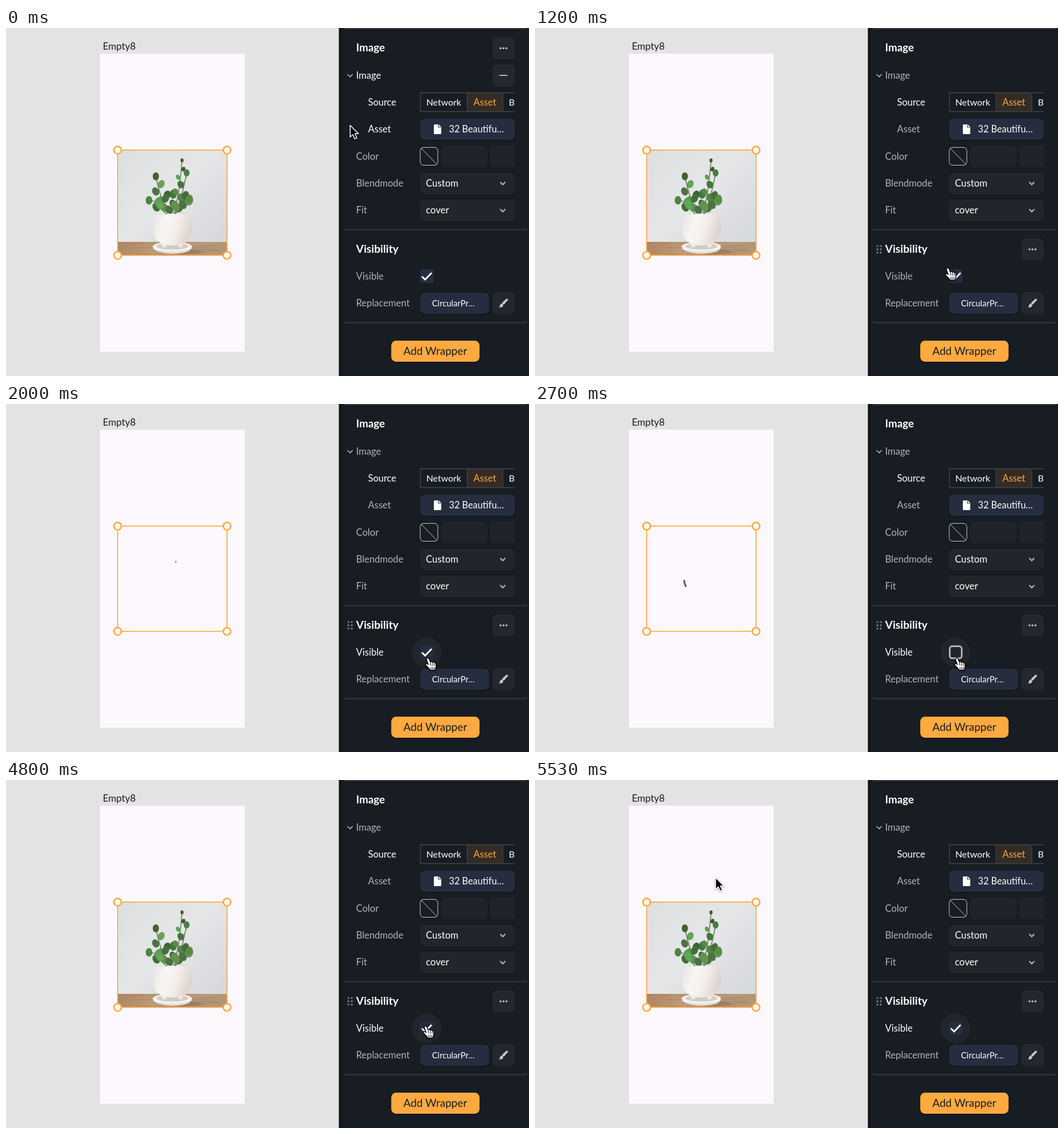
An HTML page that plays this animation: 918 by 610 pixels, repeating every 5670 ms.

```html
<!DOCTYPE html>
<html lang="en">
<head>
<meta charset="utf-8">
<title>Visibility panel</title>
<style>
html, body { margin: 0; width: 100%; height: 100%; overflow: hidden; background: #e3e3e3; }
svg { display: block; width: 918px; height: 610px; }
text { font-family: Lato, "Open Sans", sans-serif; white-space: pre; }
.raised { filter: drop-shadow(0 1px 1.5px rgba(0, 0, 0, .4)); }
</style>
</head>
<body>
<svg viewBox="0 0 918 610" xmlns="http://www.w3.org/2000/svg">
  <defs>
    <linearGradient id="wall" x1="0" y1="0" x2="1" y2="1">
      <stop offset="0" stop-color="#dddfe0"/><stop offset=".45" stop-color="#e5e6e8"/><stop offset="1" stop-color="#d3d5d9"/>
    </linearGradient>
    <linearGradient id="wood" x1="0" y1="0" x2="1" y2="0">
      <stop offset="0" stop-color="#ae8662"/><stop offset=".4" stop-color="#c2a182"/><stop offset="1" stop-color="#b39477"/>
    </linearGradient>
    <linearGradient id="china" x1="0" y1="0" x2="1" y2=".25">
      <stop offset="0" stop-color="#e6e2de"/><stop offset=".35" stop-color="#f8f6f4"/><stop offset=".65" stop-color="#f3efec"/><stop offset="1" stop-color="#ddd6d0"/>
    </linearGradient>
    <clipPath id="photoClip"><rect x="196" y="214" width="192" height="184.5"/></clipPath>
    <clipPath id="panelClip"><rect x="584" y="0" width="309" height="610"/></clipPath>
  </defs>

  <rect width="918" height="610" fill="#e3e3e3"/>
  <rect x="165" y="45" width="254" height="522.5" fill="#fcf8fe"/>

  <g id="photo" clip-path="url(#photoClip)">
    <rect x="196" y="214" width="192" height="185" fill="url(#wall)"/>
    <rect x="196" y="375" width="192" height="24" fill="url(#wood)"/>
    <g id="grain" stroke="#8d6a4b" opacity=".5"></g>
    <ellipse cx="304" cy="392" rx="40" ry="5" fill="#7d6048" opacity=".4"/>
    <g id="stems" fill="none" stroke="#66724b" stroke-width="1.5"></g>
    <g id="leaves"></g>
    <path d="M258 386Q260 391 273 394Q292 398 312 394Q324 391 326 386Z" fill="#ddd8d2"/>
    <ellipse cx="292" cy="383.5" rx="34.5" ry="9" fill="#f4f1ee"/>
    <ellipse cx="292" cy="382.5" rx="28" ry="6" fill="#d3ccc5"/>
    <path d="M270 370L275 384Q278 386 281 383L284 376ZM300 376L303 383Q306 386 309 384L315 370Z" fill="#efebe7"/>
    <path d="M264 328C257 338 256 356 261 366C266 377 280 381 292 381C306 381 320 377 324 366C329 354 328 338 321 328Q292 323 264 328Z" fill="url(#china)"/>
  </g>

  <path id="spinner" fill="none" stroke="#5f4f98" stroke-width="3"/>

  <rect x="196" y="214" width="192" height="184.5" fill="none" stroke="#fbaa43" stroke-width="1.7"/>
  <g id="grips" fill="#fff" stroke="#fbaa43" stroke-width="2.7"></g>

  <rect x="584.5" width="334" height="610" fill="#181d23"/>
  <rect x="584.5" width="5" height="610" fill="#12161c"/>
  <path d="M593.5 1H914M593.5 353.5H914M593.5 516.5H914" stroke="#3c4148" stroke-width="1.4"/>

  <g clip-path="url(#panelClip)">
    <rect x="810" y="114" width="62" height="32.5" fill="#342b25"/>
    <path d="M900 113.5H727.5V146.5H900M809.5 113.5V146.5M872 113.5V146.5" fill="none" stroke="#41464d" stroke-width="1.3"/>
    <rect class="raised" x="727" y="159" width="166" height="37" rx="8" fill="#252d3f"/>
    <path d="M752.5 169H759.5L764 173.5V184.5Q764 186 762.5 186H752.5Q751 186 751 184.5V170.5Q751 169 752.5 169Z" fill="#fff"/>
    <path d="M759 169.5V174H763.5" fill="none" stroke="#252d3f" stroke-width="1.2"/>
    <g fill="none" stroke="#cfd0d1">
      <rect x="727" y="209.3" width="31" height="31.2" rx="6"/>
      <path d="M729 211L756 238.7"/>
    </g>
    <g id="fields"><rect x="764" y="206" width="81" height="38" rx="8"/><rect x="850" y="206" width="81" height="38" rx="8"/></g>
    <rect id="blendBox" x="727" y="254" width="166" height="37" rx="8"/>
    <rect id="fitBox" x="727" y="301" width="166" height="37" rx="8"/>
    <g fill="none" stroke="#b9bbbe" stroke-width="2">
      <path d="M867.5 270L872 274.5L876.5 270M867.5 317.5L872 322L876.5 317.5"/>
      <path d="M599.5 81L604 85.5L608.5 81" stroke-width="1.6"/>
    </g>
    <g id="minus">
      <rect x="854" y="63.5" width="39" height="39" rx="7.5" fill="#24282e"/>
      <path d="M866 83H880" stroke="#c3c5c7" stroke-width="1.8"/>
    </g>
    <g id="moreImage"></g>
    <g id="moreVisibility"></g>
  </g>

  <circle id="halo" cx="738.3" cy="435.3" r="26"/>
  <rect id="boxOff" x="728" y="424.7" width="21" height="21" rx="4" fill="none" stroke="#bec0c3" stroke-width="2.7"/>
  <g id="boxOn">
    <rect x="726.5" y="423" width="24" height="24" rx="4.5" fill="#252e41"/>
    <path id="tick" d="M730 435.5L735.7 441L747 429.3" pathLength="1" fill="none" stroke="#fff" stroke-width="2.8"/>
  </g>

  <rect class="raised" x="727" y="464" width="121" height="37" rx="8.5" fill="#252d3f"/>
  <rect x="854" y="463" width="39" height="39" rx="7.5" fill="#24282e"/>
  <path d="M879 474.5L881 476.5L873.5 484.5L871 482Z" fill="#c6c8ca" stroke="#c6c8ca" stroke-linejoin="round"/>
  <path d="M869.8 483Q873 483.5 872.7 486.5Q871.5 490.5 865 489.5Q867.2 488.2 867.2 486Q867.5 483.3 869.8 483Z" fill="#c6c8ca"/>
  <rect class="raised" x="676.2" y="548" width="155" height="37" rx="8.5" fill="#ffaa40"/>

  <g id="labels"></g>

  <path id="arrow" class="raised" d="M0 0V20.5L4.8 16.2L8.2 23.8L11.8 22.2L8.5 14.8H14.6Z" fill="#000" stroke="#fff" stroke-width="1.5" stroke-linejoin="round"/>
  <g id="hand" class="raised" stroke="#000" stroke-linejoin="round">
    <path d="M-2.5 2C-4-1.5 .3-3 1.6-.3L4 5.5C5 4 7.4 4.3 7.8 6C9 4.8 11 5.2 11.4 6.9C13 6.3 14.2 7.5 14 9.8L13.6 14.5L12.3 19.5H3.6C2.4 16.5-.4 14.5-4 11C-5.6 8.6-2.6 7.4 .4 9.8Z" fill="#fff" stroke-width="1.3"/>
    <path d="M4.2 6L5 12M7.9 6.5L8.3 12M11.3 7.5V12M5 14V18M7.8 14V18M10.5 14V18"/>
  </g>
</svg>
<script>
const LOOP = 5670, HIDE = 2000, REVEAL = 3400, LEAVE = 4700, LAST = 5530;
const GREY = '#b0b3b7', WHITE = '#fff', PEACH = '#e9c48f', BLUE = '#252d3f', FIELD = '#22262c';
const $ = id => document.getElementById(id);
const set = (el, attrs) => { for (const k in attrs) el.setAttribute(k, attrs[k]); return el; };
const add = (parent, tag, attrs) =>
  parent.appendChild(set(document.createElementNS('http://www.w3.org/2000/svg', tag), attrs));
const show = (id, on) => set($(id), { visibility: on ? 'visible' : 'hidden' });
const mix = (a, b, f) => a + (b - a) * f;
const clamp = x => Math.min(1, Math.max(0, x));

let seed = 7;
const random = () => (seed = seed * 16807 % 2147483647) / 2147483647;

// y is the middle of the row
function label(text, x, y, fill = WHITE, size = 16.6, extra = {}) {
  const el = add($('labels'), 'text', { x, y: y + 5.8, fill, 'font-size': size, ...extra });
  el.textContent = text;
  return el;
}

const bold = { 'font-weight': 700 };
const middle = { 'text-anchor': 'middle' };
const ROW = 47.3;
const rowY = n => 35.6 + n * ROW;
label('Empty8', 170, 32.2, '#1c1c1e', 17);
label('Image', 614.5, rowY(0), WHITE, 18.8, bold);
label('Visibility', 614.5, 388.2, WHITE, 19.3, bold);
label('Source', 635.5, rowY(2), WHITE, 16.5);
label('Network', 768.3, rowY(2), WHITE, 15.9, middle);
label('Asset', 840.5, rowY(2), '#fbaa43', 16.4, middle);
label('B', 882.5, rowY(2), WHITE, 16, { 'clip-path': 'url(#panelClip)' });
label('32 Beautifu…', 777.5, rowY(3), WHITE, 16.3);
label('Custom', 737, rowY(5), WHITE, 16.8);
label('cover', 737, rowY(6), WHITE, 16.8);
label('Replacement', 614.5, 482.5, GREY);
label('CircularPr…', 785, 482, WHITE, 14.8, middle);
label('Add Wrapper', 753.5, 567, '#191c20', 19, middle);

const rows = {};
function row(text, x, y) { rows[text] = { y, el: label(text, x, y) }; }
row('Image', 614.5, rowY(1));
row('Asset', 635.5, rowY(3));
row('Color', 614.5, rowY(4));
row('Blendmode', 614.5, rowY(5));
row('Fit', 614.5, rowY(6));
row('Visible', 614.5, 435.2);
const rowAt = y => Object.keys(rows).find(name => Math.abs(rows[name].y - y) < ROW / 2);

function moreButton(id, y) {
  add($(id), 'rect', { x: 854, y: y - 19.5, width: 39, height: 39, rx: 7.5, fill: '#24282e' });
  for (let i = -1; i < 2; i++) add($(id), 'circle', { cx: 873.2 + i * 5.3, cy: y, r: 1.8, fill: '#c3c5c7' });
}
moreButton('moreImage', 35.5);
moreButton('moreVisibility', 388);
for (let i = 0; i < 6; i++)
  add($('moreVisibility'), 'circle', { cx: 601 + i % 2 * 6, cy: 382.2 + (i >> 1) * 5.7, r: 1.8, fill: '#6f737a' });
for (let i = 0; i < 4; i++)
  add($('grips'), 'circle', { cx: 196 + i % 2 * 192, cy: 214 + (i >> 1) * 184.5, r: 6.5 });

for (let y = 376; y < 399; y += 3) {
  const x = 196 + random() * 90;
  add($('grain'), 'path', { d: `M${x} ${y}h${60 + random() * 90}` });
}

function leaf(cx, cy, size, turn) {
  const fill = `hsl(${95 + random() * 25} ${24 + random() * 10}% ${27 + random() * 24}%)`;
  add($('leaves'), 'ellipse', { cx, cy, rx: size * .78, ry: size, fill, transform: `rotate(${turn} ${cx} ${cy})` });
}

// A bent stem with leaves on alternating sides, shrinking towards the tip
function stem(tipX, tipY, count, tipSize) {
  const baseX = mix(290, tipX, .2), bendX = mix(290, tipX, .7), bendY = 300;
  add($('stems'), 'path', { d: `M${baseX} 328Q${bendX} ${bendY} ${tipX} ${tipY}` });
  for (let i = 0; i < count; i++) {
    const u = mix(.3, 1, i / (count - 1));
    const size = mix(8.5, tipSize, u);
    const side = i === count - 1 ? 0 : i % 2 ? 1 : -1;
    leaf(mix(mix(baseX, bendX, u), mix(bendX, tipX, u), u) + side * size * .9,
      mix(mix(328, bendY, u), mix(bendY, tipY, u), u), size, side * 25);
  }
}
for (let i = 0; i < 9; i++)
  leaf(292 + 20 * Math.cos(i * 2.4), 305 + 14 * Math.sin(i * 2.4), 7 + random() * 2, random() * 120 - 60);
stem(251, 302, 3, 7.5);
stem(263, 260, 5, 7);
stem(309, 232, 7, 3.5);
stem(317, 254, 4, 6.5);
stem(322, 300, 3, 8);

// Material "fast out, slow in": cubic-bezier(.4, 0, .2, 1)
function ease(x) {
  if (x <= 0 || x >= 1) return clamp(x);
  let lo = 0, hi = 1, u;
  for (let i = 0; i < 18; i++) {
    u = (lo + hi) / 2;
    const bx = 1.2 * u * (1 - u) ** 2 + .6 * u * u * (1 - u) + u ** 3;
    if (bx < x) lo = u; else hi = u;
  }
  return 3 * u * u * (1 - u) + u ** 3;
}

// One glide down to the checkbox, one accelerating glide out to the canvas
function pointerAt(t) {
  const down = ease((t - 420) / 1200);
  const out = clamp((t - LEAVE) / (LAST - LEAVE));
  return [
    mix(mix(604, 741, down ** 1.33), 317, out ** 2.2),
    mix(mix(170.5, 447, down), 171, out ** 1.4)
  ];
}

function spinnerPath(ms) {
  const phase = ms / 1333 % 1;
  const head = ease(phase * 2) * 1.5 * Math.PI;
  const tail = ease(phase * 2 - 1) * 1.5 * Math.PI;
  const start = -Math.PI / 2 + tail + ms / 2222 * 2 * Math.PI + phase * Math.PI / 2;
  const sweep = Math.max(head - tail, .01);
  const at = a => `${291.8 + 30.3 * Math.cos(a)} ${306.2 + 30.3 * Math.sin(a)}`;
  return `M${at(start)}A30.3 30.3 0 ${sweep > Math.PI ? 1 : 0} 1 ${at(start + sweep)}`;
}

function render(time) {
  const t = time >= LAST ? LAST : Math.min(5400, Math.floor(time / 100) * 100);

  const hidden = t >= HIDE && t < REVEAL;
  show('photo', !hidden);
  show('spinner', hidden);
  if (hidden) set($('spinner'), { d: spinnerPath((t - HIDE + 23) * 2) });

  // The panel reacts one step late and keeps its state once the pointer leaves
  const seen = Math.min(t, LEAVE);
  const hover = rowAt(pointerAt(seen - 100)[1]);
  const inImage = hover === 'Asset';
  for (const name in rows) {
    const lit = name === hover || name === 'Image' && inImage;
    set(rows[name].el, { fill: !lit ? GREY : name === 'Color' ? PEACH : WHITE });
  }
  set($('fields'), { fill: hover === 'Color' ? BLUE : '#20242a' });
  set($('blendBox'), { fill: hover === 'Blendmode' ? BLUE : FIELD });
  set($('fitBox'), { fill: hover === 'Fit' ? BLUE : FIELD });
  const above = pointerAt(seen)[1] < 353;
  show('minus', inImage);
  show('moreImage', above);
  show('moreVisibility', !above);

  show('halo', seen >= 1700);
  set($('halo'), { fill: t < HIDE ? '#1b202c' : FIELD });
  const off = t >= HIDE + 100 && t < REVEAL + 100;
  show('boxOff', off);
  show('boxOn', !off);
  set($('tick'), { 'stroke-dasharray': `${t < REVEAL ? 1 : clamp((t - REVEAL) / 200)} 2` });

  const [x, y] = pointerAt(t);
  const onBox = Math.hypot(x - 738, y - 435) < 22;
  show('arrow', !onBox);
  show('hand', onBox);
  set($(onBox ? 'hand' : 'arrow'), { transform: `translate(${x} ${y})` });
}

const begin = performance.now();
function frame() {
  render((performance.now() - begin) % LOOP);
  requestAnimationFrame(frame);
}
frame();
</script>
</body>
</html>
```
